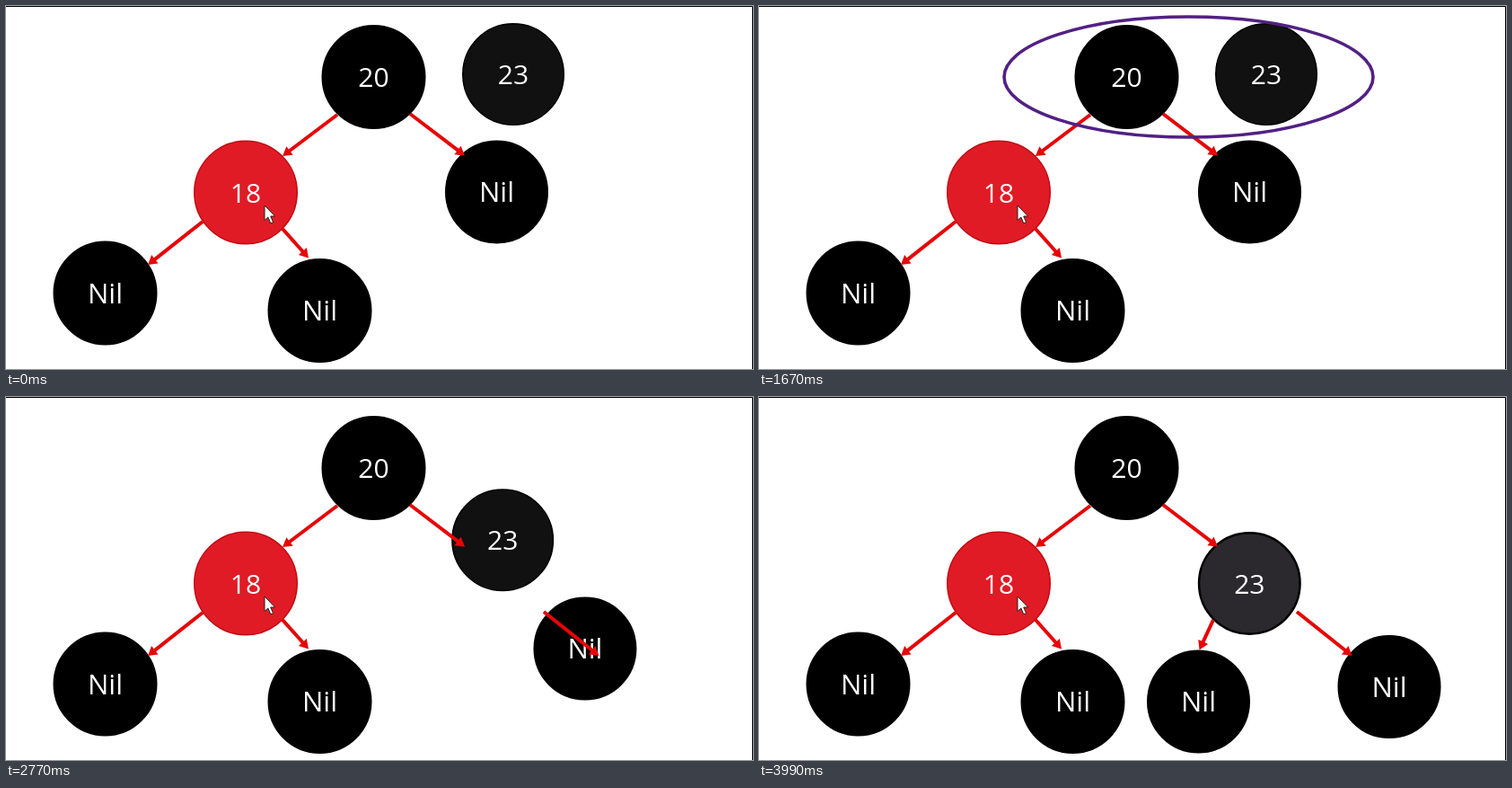
Animation, 832 px wide and 404 px high, one loop 4.03 s. Source, as an HTML page with a canvas:

```html
<!DOCTYPE html>
<html lang="en">
<head>
<meta charset="utf-8">
<title>Tree insertion</title>
<style>
  html, body { margin: 0; width: 100%; height: 100%; overflow: hidden; background: #fff; }
  svg, canvas { position: absolute; left: 0; top: 0; width: 832px; height: 404px; }
  text { font-family: "Open Sans", "Noto Sans", sans-serif; fill: #fff; text-anchor: middle; }
</style>
</head>
<body>
<svg id="tree" viewBox="0 0 832 404"></svg>
<canvas id="ring" width="832" height="404"></canvas>
<script>
const LOOP = 4030;
const svg = document.getElementById('tree');
const ctx = document.getElementById('ring').getContext('2d');

function add(tag, attrs, parent = svg) {
  const el = document.createElementNS('http://www.w3.org/2000/svg', tag);
  for (const k in attrs) el.setAttribute(k, attrs[k]);
  parent.appendChild(el);
  return el;
}

function node(label, x, y, r = 58, fill = '#000', edge = '#000') {
  const g = add('g', { transform: `translate(${x} ${y})` });
  add('circle', { r: r - 0.75, fill, stroke: edge, 'stroke-width': 1.5 }, g);
  const size = label === 'Nil' ? 31 : 30;
  add('text', { y: 11, 'font-size': size }, g).textContent = label;
  return g;
}

function arrow(x1, y1, x2, y2) {
  const len = Math.hypot(x2 - x1, y2 - y1);
  const turn = Math.atan2(y2 - y1, x2 - x1) * 180 / Math.PI;
  const g = add('g', { transform: `translate(${x1} ${y1}) rotate(${turn})`, fill: '#e60506' });
  add('path', { d: `M0-2H${len - 10}V-6L${len} 0L${len - 10} 6V2H0Z` }, g);
  return g;
}

node('20', 409.5, 79);
node('18', 267, 207.5, 58, '#e01b25', '#c20a12');
node('Nil', 110.5, 319.5);
node('Nil', 349.5, 339);
const newNil = node('Nil', 489.5, 339, 57.5);
const movedNil = node('Nil', 546.5, 207, 57.5);
const added = node('23', 565, 76, 57, '#111112');
const addedDisc = added.firstChild;

arrow(369, 121, 308, 167);
arrow(450, 120, 511, 166.5);
arrow(219, 240, 158, 288);
arrow(308, 248, 337, 280.5);
const rightArrow = arrow(599, 239, 660.5, 288);
const leftArrow = arrow(506, 248, 490.5, 281.5);

// mouse pointer
add('path', {
  d: 'M288 222V238.5L291.8 235L294.8 241.8L297.6 240.6L294.7 234H299.6Z',
  fill: '#fff', stroke: '#222', 'stroke-width': 1
});
add('path', { d: 'M0 .5H831.5V404', fill: 'none', stroke: '#000' });

const clamp = v => Math.max(0, Math.min(1, v));
const span = (t, a, b) => clamp((t - a) / (b - a));
const mix = (a, b, p) => a + (b - a) * p;

// Two-spoke wheel: front angle in degrees, trailed by a soft edge
const RX = 205.5, RY = 67, SOFT = 20;

function wheelIn(t) {
  return t < 1180 ? 63 * span(t, 1070, 1180) : mix(63, 180 + SOFT, span(t, 1180, 1520));
}

function drawRing(t) {
  ctx.clearRect(0, 0, 832, 404);
  if (t < 1070 || t > 2400) return;
  const leaving = t > 1890;
  const front = leaving ? (180 + SOFT) * span(t, 1890, 2400) : wheelIn(t);
  const paint = ctx.createConicGradient(-Math.PI / 2, 478.5, 79);
  for (const half of [0, 0.5]) {
    for (let a = 0; a <= 180; a += 2) {
      const rad = a * Math.PI / 180;
      const turn = Math.atan2(RX * Math.sin(rad), RY * Math.cos(rad)) / (2 * Math.PI);
      const shown = clamp((front - a) / SOFT);
      paint.addColorStop(clamp(half + turn), `rgba(82,32,132,${leaving ? 1 - shown : shown})`);
    }
  }
  ctx.strokeStyle = paint;
  ctx.lineWidth = 3.6;
  ctx.beginPath();
  ctx.ellipse(478.5, 79, RX, RY, 0, 0, 2 * Math.PI);
  ctx.stroke();
}

function place(el, x1, y1, x2, y2, p) {
  el.setAttribute('transform', `translate(${mix(x1, x2, p)} ${mix(y1, y2, p)})`);
}

function draw(t) {
  drawRing(t);
  const move = span(t, 2457, 2953);
  place(added, 565, 76, 546.3, 207.5, move);
  place(movedNil, 546.5, 207, 702, 322.5, move);
  rightArrow.setAttribute('opacity', span(t, 2457, 2670));

  const fade = span(t, 2960, 3220);
  newNil.setAttribute('opacity', fade);
  leftArrow.setAttribute('opacity', fade);

  const grey = span(t, 3000, 3260);
  addedDisc.setAttribute('fill',
    `rgb(${mix(17, 43, grey)},${mix(17, 41, grey)},${mix(18, 46, grey)})`);
  addedDisc.setAttribute('stroke-width', mix(1.5, 2.5, grey));
}

const start = performance.now();
function tick() {
  draw((performance.now() - start) % LOOP);
  requestAnimationFrame(tick);
}
tick();
</script>
</body>
</html>
```
